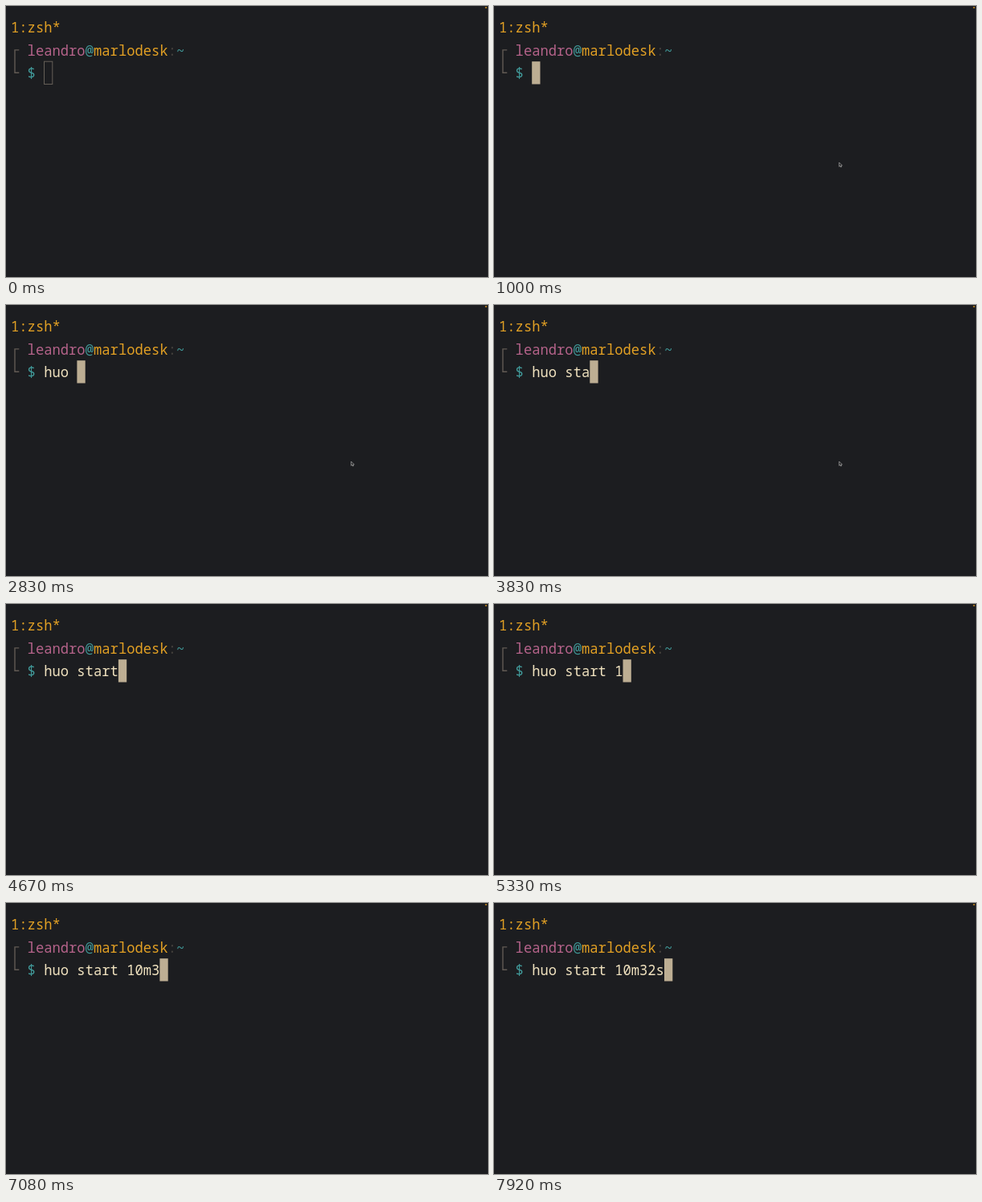
An HTML page for the animation above (8 s loop, 600x338 px).

```html
<!DOCTYPE html>
<html lang="en">
<head>
<meta charset="utf-8">
<title>Terminal typing</title>
<style>
  html, body { margin: 0; width: 100%; height: 100%; overflow: hidden; background: #1c1d20; }
  svg { display: block; width: 600px; height: 338px; }
  text { font: 500 17.17px "Noto Sans Mono", "DejaVu Sans Mono", monospace; white-space: pre; }
</style>
</head>
<body>
<svg id="stage" viewBox="0 0 600 338">
  <rect width="600" height="338" fill="#1c1d20"/>
  <circle cx="597.5" cy="2" r="1" fill="#dc9a20"/>
  <path d="M16.3 54.9H11V83.2H16.3" fill="none" stroke="#625b54" stroke-width="1.4"/>
  <g id="prompt"></g>
  <rect id="cursor" y="69.2" width="10.3" height="28.3"/>
  <path id="pointer" d="M0 0V5.1L1.2 4.1L2 5.8L2.9 5.4L2.1 3.8H3.7Z"
        fill="#1b1b1b" stroke="#b4b4b4" stroke-width=".7" stroke-linejoin="round"/>
</svg>
<script>
const LOOP = 8000, TICK = 1000 / 12;
const LEFT = 6, ADVANCE = 10.3, FIRST_COL = 4;
const COMMAND = "huo start 10m32s";
// Tick at which each character of the command appears.
const KEYS = [24, 27, 30, 34, 38, 42, 46, 51, 56, 60, 64, 69, 74, 85, 90, 95];
const ENTER = 4, FOCUS = 10, FADE_START = 48, FADE_END = 52;

const byId = id => document.getElementById(id);
const prompt = byId("prompt"), cursor = byId("cursor"), pointer = byId("pointer");
const colX = col => LEFT + col * ADVANCE;
const clamp = v => Math.max(0, Math.min(1, v));

function addText(col, row, color, content) {
  const el = document.createElementNS("http://www.w3.org/2000/svg", "text");
  el.setAttribute("x", colX(col));
  el.setAttribute("y", 33.3 + row * 28.4);
  el.setAttribute("fill", color);
  el.textContent = content;
  return prompt.appendChild(el);
}

addText(0, 0, "#e2a024", "1:zsh*");
addText(2, 1, "#b5638a", "leandro");
addText(9, 1, "#419a9a", "@");
addText(10, 1, "#e2a024", "marlodesk");
addText(19, 1, "#45413d", ":");
addText(20, 1, "#419a9a", "~");
addText(2, 2, "#419a9a", "$");
const command = addText(FIRST_COL, 2, "#f0e2bf", "");

function drawCursor(typed, focused) {
  cursor.setAttribute("x", colX(FIRST_COL + typed) + (focused ? 0 : 0.3));
  cursor.setAttribute("fill", focused ? "#bdae93" : "none");
  cursor.setAttribute("stroke", focused ? "none" : "#655f57");
}

function drawPointer(tick) {
  const left = (1 - clamp((tick - ENTER) / (FOCUS - ENTER))) ** 2;
  const x = 429.7 + 40 * left, y = 195.2 + 132 * left;
  pointer.setAttribute("transform", `translate(${x} ${y})`);
  pointer.setAttribute("opacity",
    tick < ENTER ? 0 : 1 - clamp((tick - FADE_START) / (FADE_END - FADE_START)));
}

function render(time) {
  const tick = Math.floor((time % LOOP + 4) / TICK);
  const typed = KEYS.filter(key => key <= tick).length;
  command.textContent = COMMAND.slice(0, typed);
  drawCursor(typed, tick >= FOCUS);
  drawPointer(tick);
}

const start = performance.now();
function frame() {
  render(performance.now() - start);
  requestAnimationFrame(frame);
}
frame();
</script>
</body>
</html>
```
